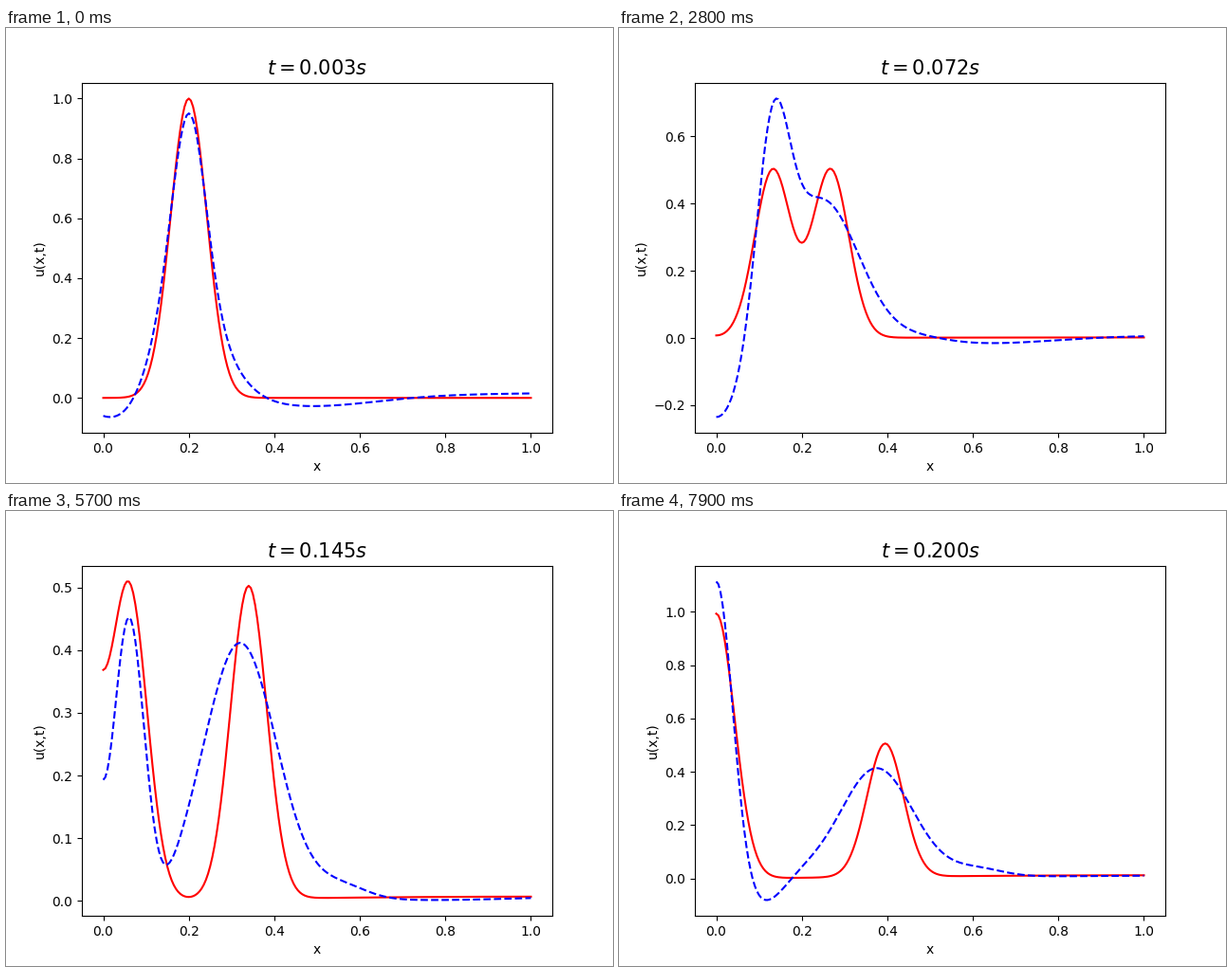
A matplotlib script that plays this animation: 640 by 480 pixels, repeating every 8000 ms.

```python
import numpy as np
import matplotlib.pyplot as plt
from matplotlib.animation import FuncAnimation

FRAMES, INTERVAL = 80, 100
x = np.linspace(0, 1, 201)


def bump(q, height, center, sigma):
    return height * np.exp(-0.5 * ((q - center) / sigma) ** 2)


def exact(t):
    """Gaussian of half width 0.1 that splits and reflects at x=0."""
    s = max(t - 0.005, 0)
    sigma = 0.1 / np.sqrt(8 * np.log(2))
    drift = 0.31 * t ** 2 * np.sin(np.pi / 2 * x) ** 1.2
    return drift + sum(bump(x, 0.5, c, sigma) for c in (0.2 - s, 0.2 + s, s - 0.2))


def profile(q):
    """Travelling shape: sharp left pulse, trough, wide right pulse."""
    return (bump(q, 0.588, -0.204, 0.038) + bump(q, -0.125, -0.079, 0.07)
            + bump(q, 0.41, 0.175, 0.085))


def approximate(t):
    """Reflected wave with slow errors near the wall and in the tail."""
    wave = profile(x - t) + profile(-x - t)
    near = bump(x, 0.6 * (t - 0.095), 0.08 + 0.5 * t, 0.05)
    foot = bump(x, 0.15 * t, 0.41 + t, 0.06)
    dip = bump(x, -0.036 * max(1 - t / 0.16, 0), 0.48 + 2.2 * t, 0.155)
    slope = 0.005 + 0.8 * (t - 0.115) ** 2
    return wave + near + foot + dip + slope * x


fig, ax = plt.subplots(figsize=(6.4, 4.8), dpi=100)
exact_line, = ax.plot(x, exact(0), "r-")
approx_line, = ax.plot(x, approximate(0), "b--")
ax.set_xlabel("x")
ax.set_ylabel("u(x,t)")
title = ax.set_title("", fontsize=15)


def draw(k):
    t = (k + 1) / 400
    exact_line.set_ydata(exact(t))
    approx_line.set_ydata(approximate(t))
    ax.relim()
    ax.autoscale_view()
    title.set_text(f"$t={t:.3f}s$")
    return exact_line, approx_line, title


anim = FuncAnimation(fig, draw, frames=FRAMES, interval=INTERVAL, repeat=True)
plt.show()
```
